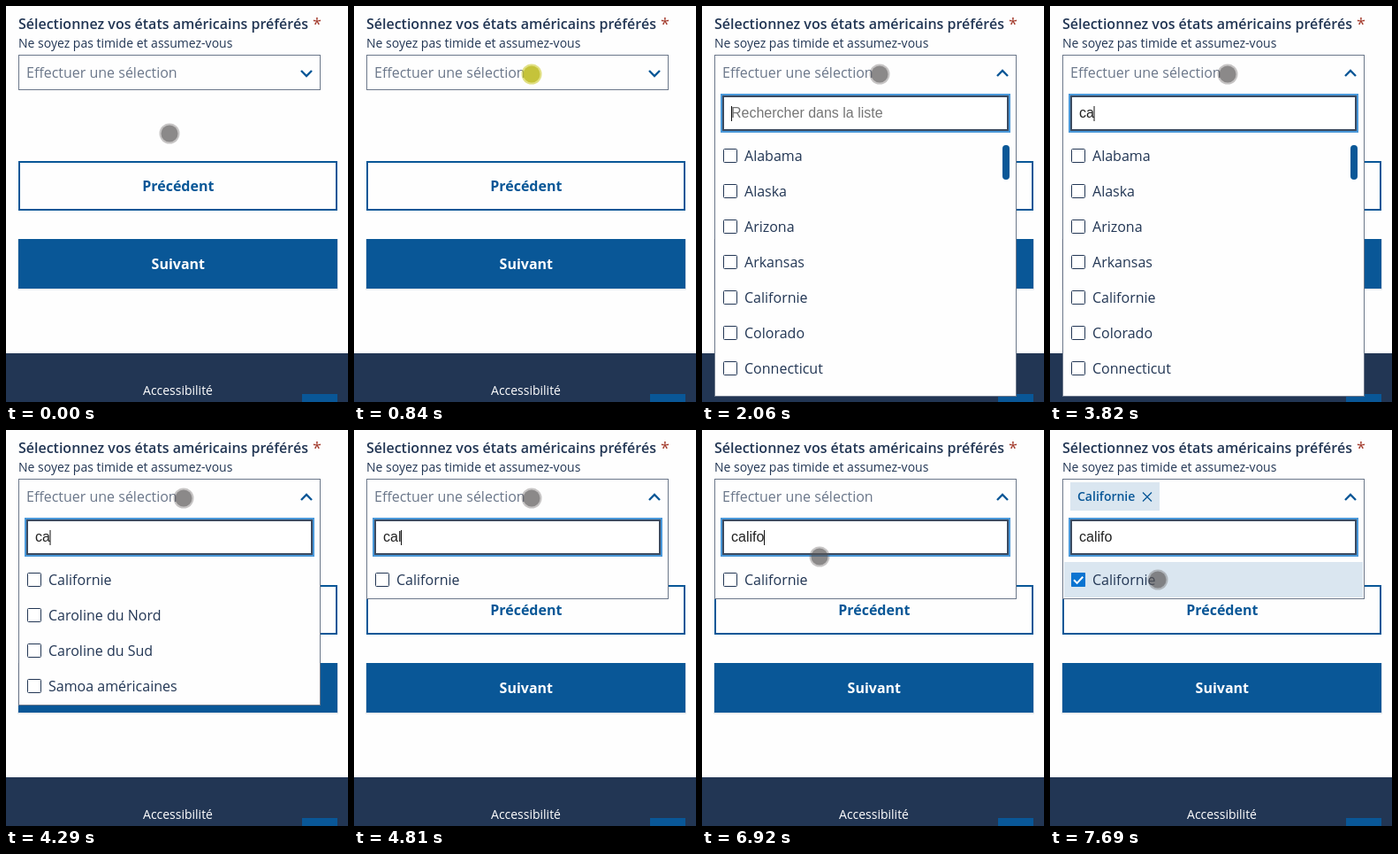
These frames come from a looping animation (387x447 px, 8000 ms). An HTML page:

```html
<!DOCTYPE html>
<html lang="fr">
<head>
<meta charset="utf-8">
<style>
  html, body { margin: 0; width: 100%; height: 100%; overflow: hidden; background: #fefefe; }
  svg { display: block; font: 16px "Open Sans", sans-serif; fill: #223654; }
  [hidden] { display: none; }
  .semi { font-weight: 600; }
  .bold { font-weight: 700; }
  .small { font-size: 14px; }
  .mid { text-anchor: middle; }
  .blue { fill: #095797; }
  .muted { fill: #6b778a; }
  .pale { fill: #dae6f0; }
  .white { fill: #fff; }
  .frame { fill: #fefefe; stroke: #6b778a; }
  .line { fill: none; stroke: #095797; }
  .search { font-family: "Liberation Sans", Arial, sans-serif; }
</style>
</head>
<body>
<svg width="387" height="447" viewBox="0 0 387 447">
  <text class="semi" x="14" y="26">Sélectionnez vos états américains préférés</text>
  <text x="347" y="27" font-size="18" fill="#a3392b">*</text>
  <text class="small" x="14" y="47">Ne soyez pas timide et assumez-vous</text>

  <rect class="line" x="15" y="176" width="359" height="54" stroke-width="2"/>
  <text class="bold blue mid" x="194.8" y="209">Précédent</text>
  <rect x="13" y="263" width="363" height="57.5" fill="#223654" opacity=".12"/>
  <rect class="blue" x="14" y="263" width="361" height="56"/>
  <text class="bold white mid" x="194.8" y="297">Suivant</text>
  <rect y="392" width="387" height="55"/>
  <text class="small white mid" x="194.5" y="439">Accessibilité</text>
  <rect class="blue" x="335" y="438" width="40" height="9"/>

  <rect id="panel" class="frame" x="14.5" y="55.5" width="341" height="39"/>
  <text id="prompt" class="muted" x="23" y="81">Effectuer une sélection</text>
  <path id="chevron" class="line" stroke-width="2.4"/>

  <g id="chip">
    <rect class="pale" x="23" y="59" width="101" height="32"/>
    <text class="small semi blue" x="31" y="80">Californie</text>
    <path class="line" stroke-width="1.3" d="M105 70.5l10 10m0-10l-10 10"/>
  </g>

  <g id="menu">
    <rect x="22" y="100" width="326" height="42" fill="#fff" stroke="#4a98d9" stroke-width="2"/>
    <rect x="24" y="102" width="322" height="38" fill="#fff" stroke="#3a4a60" stroke-width="2"/>
    <text id="query" class="search" x="33" y="126"></text>
    <rect id="caret" y="113" width="1" height="17" fill="#111"/>
    <rect id="highlight" class="pale" x="16" y="149" width="338" height="40"/>
    <g id="rows"></g>
    <g id="check">
      <rect x="24" y="161" width="16" height="16" rx="1" fill="#0b74d1"/>
      <path d="M27 169.3l3.6 3.6 6.6-7.2" fill="none" stroke="#fff" stroke-width="2"/>
    </g>
    <rect id="scrollbar" class="blue" x="340" y="157" width="8" height="39" rx="4"/>
  </g>

  <g id="pointer">
    <circle id="ring" r="11.5"/>
    <circle id="dot" r="9.5"/>
  </g>
</svg>
<script>
const $ = id => document.getElementById(id);
const show = (id, on) => $(id).toggleAttribute('hidden', !on);
const within = (t, a, b) => t >= a && t < b;

const LOOP = 8000, OPEN = 970, PICK = 7500, BLINK = 530;
const ALL = ['Alabama', 'Alaska', 'Arizona', 'Arkansas', 'Californie', 'Colorado', 'Connecticut'];
const MATCHES = ['Californie', 'Caroline du Nord', 'Caroline du Sud', 'Samoa américaines'];
const KEYS = [3510, 3820, 4500, 4910, 5250, 5590];
const WORD = 'califo';
const CARET_X = [33, 41, 49.5, 53, 57, 61, 70];
// time, x, y
const PATH = [
  [500, 185, 144], [560, 187, 136], [740, 200, 83], [800, 201, 77],
  [6620, 201, 77], [6740, 182, 93], [6920, 133, 143], [7040, 123, 164], [7160, 122, 169]
];

function pointerAt(t) {
  const start = t < 3000 ? 500 : 6620;
  t = start + Math.floor((t - start) / 60) * 60;
  const i = PATH.findIndex(p => p[0] > t);
  if (i < 0) return PATH.at(-1).slice(1);
  if (i === 0) return PATH[0].slice(1);
  const [t0, x0, y0] = PATH[i - 1], [t1, x1, y1] = PATH[i];
  const k = (t - t0) / (t1 - t0);
  return [x0 + (x1 - x0) * k, y0 + (y1 - y0) * k];
}

let shownRows;
function setRows(names) {
  if (names.join() === shownRows) return;
  shownRows = names.join();
  $('rows').innerHTML = names.map((name, i) => `
    <rect x="24.5" y="${161.5 + 40 * i}" width="15" height="15" rx="1" fill="#fff" stroke="#223654"/>
    <text x="48" y="${175 + 40 * i}">${name}</text>`).join('');
}

function draw(t) {
  const open = t >= OPEN, picked = t >= PICK;
  const typed = KEYS.filter(k => t >= k).length;
  const names = t < 4290 ? ALL : t < 4810 ? MATCHES : MATCHES.slice(0, 1);
  const full = names === ALL;

  $('panel').setAttribute('height', !open ? 39 : full ? 385 : 95 + 40 * names.length);
  $('chevron').setAttribute('d', open ? 'M334 79l6-6 6 6' : 'M334 73l6 6 6-6');
  setRows(names);
  show('menu', open);
  show('scrollbar', full);
  show('prompt', !picked);
  for (const id of ['chip', 'highlight', 'check']) show(id, picked);

  $('query').textContent = typed ? WORD.slice(0, typed) : 'Rechercher dans la liste';
  $('query').style.fill = typed ? '#222' : '#757575';
  const since = t - (typed ? KEYS[typed - 1] : OPEN);
  $('caret').setAttribute('x', CARET_X[typed]);
  show('caret', Math.floor((since + 8) / BLINK) % 2 === 0);

  const pressed = within(t, 810, OPEN) || within(t, 7380, PICK + 60);
  $('pointer').setAttribute('transform', `translate(${pointerAt(t)})`);
  $('ring').style.fill = pressed ? 'rgba(205,203,50,.6)' : 'rgba(100,95,95,.36)';
  $('dot').style.fill = pressed ? 'rgba(190,188,40,.8)' : 'rgba(85,83,83,.52)';
}

function tick(now) {
  draw(now % LOOP);
  requestAnimationFrame(tick);
}
draw(0);
requestAnimationFrame(tick);
</script>
</body>
</html>
```
